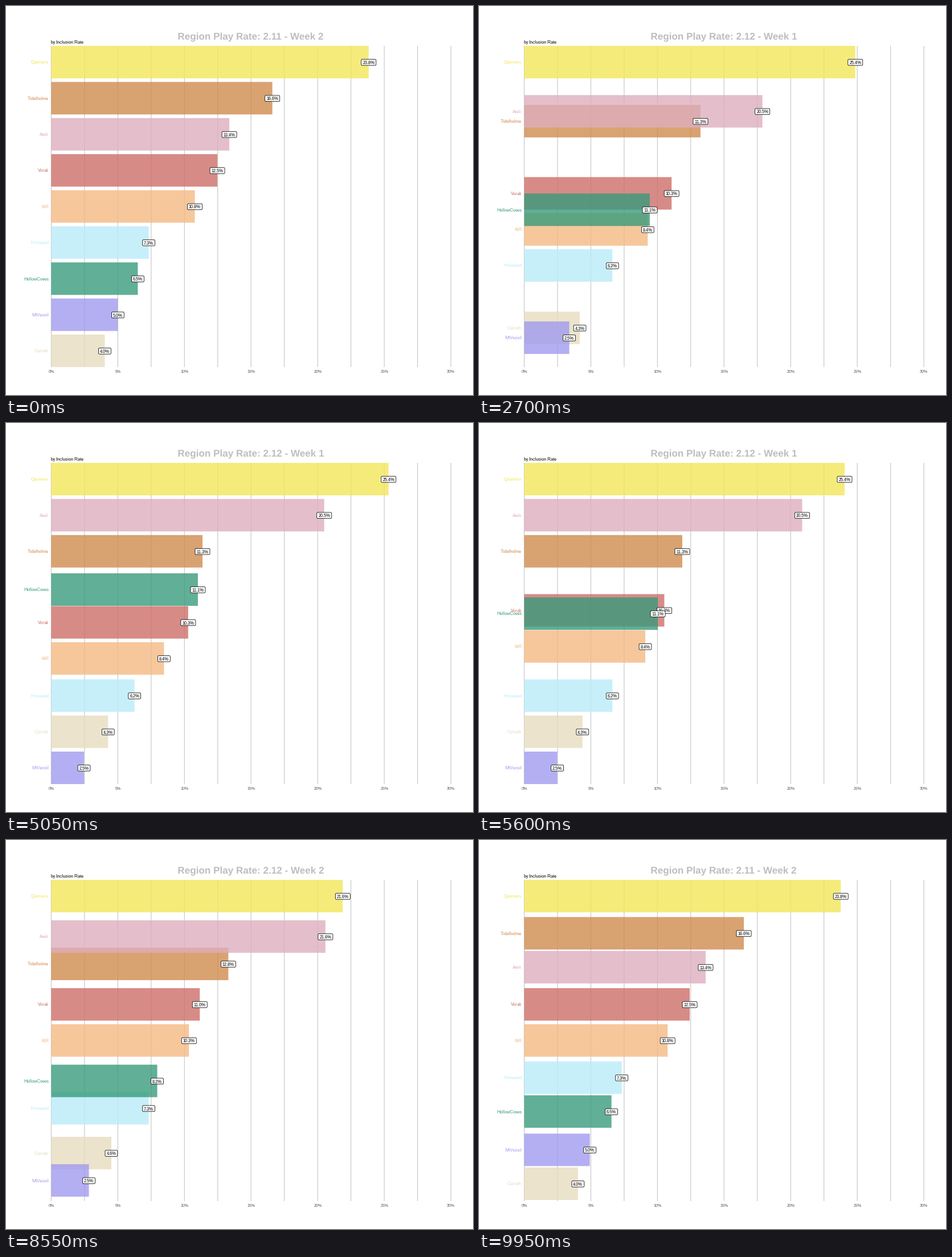
A matplotlib script for the animation above (10 s loop, 820 by 683 pixels).

```python
import matplotlib.pyplot as plt
from matplotlib.animation import FuncAnimation
from matplotlib.patches import FancyBboxPatch, PathPatch, Rectangle
from matplotlib.textpath import TextPath
from matplotlib.transforms import Affine2D

W, H, DPI = 820, 683, 64
PX = 72 / DPI                      # one pixel in points
X0, X_UNIT = 79.4, 23.39           # zero line, pixels per percent
TOP, BOTTOM = 70.0, 633.95
ROW = (BOTTOM - TOP) / 8.9
BAR_H = 0.9 * ROW
FRAMES, MOVE = 200, 33             # a move takes 33 frames
MOVE_STARTS = (33, 100, 167)

plt.rcParams.update({
    "font.family": "Liberation Sans",
    "text.hinting": "native",
    "text.hinting_factor": 1,
})

TITLES = ["2.11 - Week 2", "2.12 - Week 1", "2.12 - Week 2"]

# name, colour, share in each of the three weeks; listed in stacking order
REGIONS = [
    ("Tidelholme", "#D08B4E", (16.60, 11.31, 12.84)),
    ("Calreth", "#E6DCBE", (4.02, 4.26, 4.58)),
    ("Hrimwold", "#BAECF9", (7.32, 6.22, 7.32)),
    ("Aveli", "#DEAEBE", (13.37, 20.46, 21.58)),
    ("MtVessil", "#A19BEF", (5.00, 2.46, 2.53)),
    ("Vorak", "#CE6E69", (12.47, 10.26, 10.97)),
    ("KtR", "#F5B983", (10.78, 8.41, 10.28)),
    ("HollowCoves", "#389B7C", (6.50, 11.10, 8.16)),
    ("Qasmeru", "#F3E75A", (23.83, 25.44, 21.62)),
]


def rank(value, week):
    return sum(shares[week] > value for _, _, shares in REGIONS)


def x_pos(percent):
    return X0 + X_UNIT * percent


def title_path(week):
    path = TextPath((0, 0), "Region Play Rate: " + TITLES[week], size=17.1,
                    prop={"family": "Liberation Sans", "weight": "bold"})
    shift = 302.5 - path.get_extents().x0
    return path.transformed(Affine2D().scale(1, -1).translate(shift, 59))


fig = plt.figure(figsize=(W / DPI, H / DPI), dpi=DPI, facecolor="white")
ax = fig.add_axes([0, 0, 1, 1])
ax.set_xlim(0, W)
ax.set_ylim(H, 0)
ax.axis("off")


def put_text(x, y, text, size, color, ha, z):
    return ax.text(x, y, text, fontsize=size * PX, color=color, ha=ha,
                   va="baseline", zorder=z)


class Bar:
    def __init__(self, index, name, color, shares):
        self.shares = shares
        self.ranks = [rank(v, week) for week, v in enumerate(shares)]
        z = index / 100
        self.rect = ax.add_patch(Rectangle(
            (X0, 0), 1, BAR_H, facecolor=color, alpha=0.8, linewidth=0,
            snap=False, zorder=2 + z))
        self.name = put_text(75, 0, name, 7.6, color, "right", 3 + z)
        self.box = ax.add_patch(FancyBboxPatch(
            (0, 0), 26, 10.6, boxstyle="round,pad=0,rounding_size=1.8",
            facecolor="white", edgecolor="black", linewidth=0.8 * PX,
            snap=False, zorder=4 + z))
        self.label = put_text(0, 0, "", 7.6, "black", "center", 4 + z)

    def place(self, a, b, p):
        value = self.shares[a] + (self.shares[b] - self.shares[a]) * p
        row = self.ranks[a] + (self.ranks[b] - self.ranks[a]) * p
        x = x_pos(value)
        y = TOP + BAR_H / 2 + ROW * row
        text = f"{self.shares[b if p > 0.5 else a]:.1f}%"

        self.rect.set_bounds(X0, y - BAR_H / 2, x - X0, BAR_H)
        self.name.set_y(y + 2.8)
        width = 4.2 * len(text) + 5
        self.box.set_bounds(x - width / 2, y - 4.9, width, 10.6)
        self.label.set_text(text)
        self.label.set_position((x, y + 3.5))


for i in range(13):
    x = x_pos(2.5 * i)
    ax.plot([x, x], [TOP, BOTTOM], color="#BEBEBE", linewidth=PX,
            solid_capstyle="butt", snap=False, zorder=1)
for percent in range(0, 31, 5):
    put_text(x_pos(percent), 643.6, f"{percent}%", 6.6, "#4D4D4D", "center", 1)
put_text(79, 66, "by Inclusion Rate", 7.6, "black", "left", 1)

title_paths = [title_path(week) for week in range(3)]
title = ax.add_patch(PathPatch(title_paths[0], facecolor="#BEBEBE",
                               linewidth=0, zorder=5))
bars = [Bar(i, *region) for i, region in enumerate(REGIONS)]


def phase(frame):
    """Week before, week after and linear progress between them."""
    for week, start in enumerate(MOVE_STARTS):
        if frame <= start:
            return week, week, 0.0
        if frame < start + MOVE:
            return week, (week + 1) % 3, (frame - start) / MOVE
    return 0, 0, 0.0


def draw(frame):
    a, b, p = phase(frame)
    title.set_path(title_paths[b if p > 0.5 else a])
    for bar in bars:
        bar.place(a, b, p)
    return []


anim = FuncAnimation(fig, draw, frames=FRAMES, interval=50, repeat=True,
                     repeat_delay=0, blit=False)
plt.show()
```
